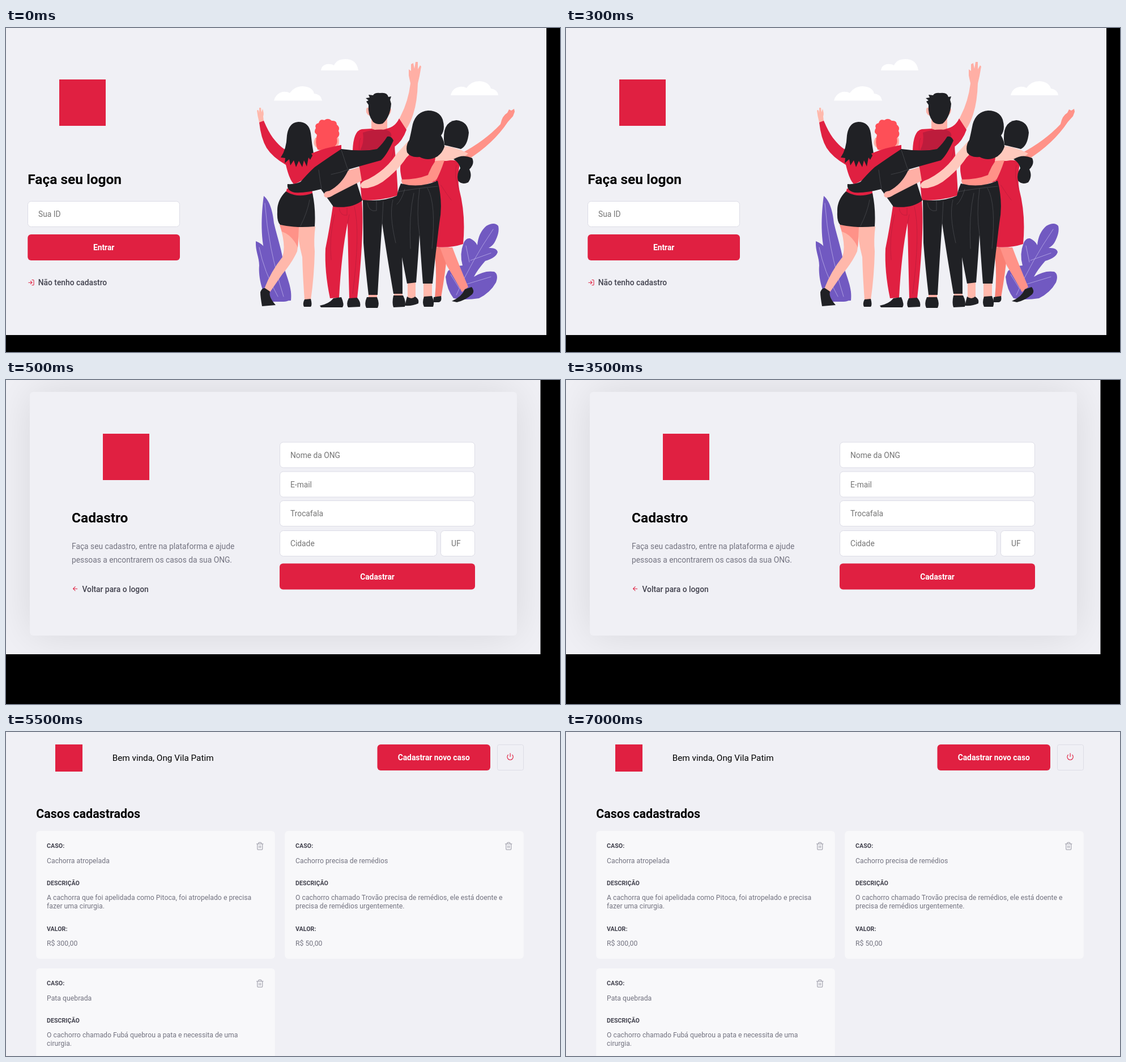
An HTML page for the animation above (8000 ms loop, 978x573 px).

```html
<!DOCTYPE html>
<html lang="pt">
<head>
<meta charset="utf-8">
<title>Cadastro de casos</title>
<style>
  html, body { margin: 0; width: 100%; height: 100%; overflow: hidden; background: #000; }
  svg { position: absolute; left: 0; top: 0; display: block; }
  text { font-family: Roboto, sans-serif; white-space: pre; }
  .icon, .line { fill: none; stroke-linecap: round; stroke-linejoin: round; }
</style>
</head>
<body>
<svg id="stage" width="978" height="573" viewBox="0 0 978 573"></svg>
<script>
const RED = '#e02041', BG = '#f0f0f5', DARK = '#41414d', GREY = '#737380', HINT = '#757575';
const BLACK = '#202125', WINE = '#bd1c3c', PURPLE = '#7159c1', GINGER = '#fe4f57';
const PALE = '#ffc9bd', SKIN = '#ffb8ab', PEACH = '#ffafa5', CORAL = '#ff9288', RUST = '#f97f73';

const rect = (x, y, w, h, fill, r = 0, extra = '') =>
  `<rect x="${x}" y="${y}" width="${w}" height="${h}" rx="${r}" fill="${fill}" ${extra}/>`;
const text = (x, y, str, size, fill, weight = 400, anchor = 'start') =>
  `<text x="${x}" y="${y}" font-size="${size}" fill="${fill}" font-weight="${weight}" text-anchor="${anchor}">${str}</text>`;
const shape = (fill, ...paths) => paths.map(d => `<path fill="${fill}" d="${d}"/>`).join('');
const line = (stroke, d, width = 0.8) =>
  `<path class="line" stroke="${stroke}" stroke-width="${width}" d="${d}"/>`;
const icon = (x, y, size, stroke, d) =>
  `<path class="icon" stroke="${stroke}" stroke-width="2" transform="translate(${x} ${y}) scale(${size / 24})" d="${d}"/>`;
const field = (x, y, w, hint) =>
  rect(x + .5, y + .5, w - 1, 45, '#fff', 6, 'stroke="#dcdce6"') + text(x + 19, y + 28, hint, 13.8, HINT);
const button = (x, y, w, label) =>
  rect(x, y, w, 46, RED, 6) + text(x + w / 2, y + 28, label, 13.8, '#fff', 700, 'middle');

const ICONS = {
  login: 'M15 3h4a2 2 0 0 1 2 2v14a2 2 0 0 1-2 2h-4M10 17l5-5-5-5M15 12H3',
  back: 'M19 12H5M12 19l-7-7 7-7',
  power: 'M18.36 6.64a9 9 0 1 1-12.73 0M12 2v10',
  trash: 'M3 6h18M19 6v14a2 2 0 0 1-2 2H7a2 2 0 0 1-2-2V6M8 6V4a2 2 0 0 1 2-2h4a2 2 0 0 1 2 2v2M10 11v6M14 11v6'
};

function scenery() {
  return shape('#fff',
      'M556 75Q557 66 566 64Q574 63 579 66Q584 55 599 55Q619 55 622 75Z',
      'M473 128.5Q476 116 488 113Q496 112 501 115Q509 103 524 103Q541 104 544 116Q556 117 558 128.5Z',
      'M785 119Q788 106 801 104Q808 103 813 106Q821 94 836 94Q852 95 856 107Q868 109 869 119Z') +
    shape(PURPLE,
      'M455 297C466 306 471 325 473 345C480 375 488 395 490 420C495 440 506 460 503 482L468 484C460 470 470 440 462 410C450 388 449 340 455 297Z',
      'M441 377C455 382 465 395 470 415C480 430 502 445 503 472Q503 484 490 484L467 484C453 475 445 440 447 420C447 405 440 395 441 377Z',
      'M780 430Q790 420 806 420Q800 400 808 380Q812 371 819 372Q828 376 832 384Q834 362 848 350Q862 342 869 350Q872 362 862 380Q858 386 852 389Q866 388 868 396Q866 406 846 412Q832 428 826 440Q845 428 862 431Q870 436 865 450Q855 468 835 478Q810 482 790 478Q778 462 776 440Z') +
    line('#b9ace6', 'M457 310Q460 350 468 390T490 475M447 388Q455 430 480 475M795 472Q822 412 860 356M818 414L812 385M820 411L856 398M803 456Q830 448 856 440M800 460L785 436');
}

function leftWoman() {
  return shape(SKIN,
      'M447 167Q444 156 443 146Q446 143 447 150L447 141L450 141L451 149L453 143Q456 152 454 156L455 165Z',
      'M483 348L517 352Q517 378 514 395Q505 415 488 435L466 467L456 461Q468 430 488 405Q495 385 483 348Z',
      'M515 352L546 351Q543 375 545 395Q544 440 538 481L527 481Q524 440 523 405Q515 375 515 352Z') +
    shape(CORAL, 'M483 348L517 352L515 388Q505 366 487 360Z') +
    shape(RED,
      'M447 167L455 164Q463 183 471 194Q485 212 495 216L530 230L545 220Q565 214 592 207L590 220Q560 235 545 248Q525 272 508 276Q500 268 494 242Q470 228 460 212Q450 195 447 167Z',
      'M496 284L540 284L542 299L492 298Z') +
    shape(BLACK,
      'M494 289Q478 305 479 325Q478 342 484 348Q510 354 545 351Q547 320 541 292Q515 302 494 289Z',
      'M516 166Q535 166 538 186Q540 205 543 222L537 233L534 229L531 245L526 234L523 246L517 235L512 246L508 234L502 243L500 232L492 239L493 230L485 229Q495 215 496 190Q499 167 516 166Z',
      'M457 460L466 466Q463 475 476 490L452 492Q449 475 449 467Q452 459 457 460Z',
      'M527 480L538 479Q541 490 538 493L526 493Q523 488 527 480Z') +
    line('#55565c', 'M536 304Q532 326 520 350', .6);
}

function gingerMan() {
  return shape(PEACH, 'M546 194Q540 206 549 212L553 217L584 212Q590 204 587 194Z') +
    shape(GINGER, 'M550 215Q545 201 549 189Q542 184 547 177Q544 170 552 168Q554 160 562 163Q569 158 575 164Q584 163 584 171Q590 175 587 182Q591 190 584 195Q587 207 576 212Q565 218 550 215Z') +
    shape(RED, 'M539 222Q565 211 592 207L592 217L550 241Z',
      'M577 315Q605 318 628 303Q633 360 620 478L606 478Q604 400 603 345Q592 400 588 477L572 478Q562 430 564 390Q572 350 577 315Z') +
    line(WINE, 'M588 318Q590 333 602 331V318M603 345L606 330M615 316Q626 360 612 470M580 330Q570 370 574 410') +
    shape(BLACK,
      'M497 276Q510 277 520 272Q535 255 545 246Q575 225 592 214Q630 219 655 214Q665 205 673 192Q680 190 684 199Q672 225 662 234Q640 240 605 250L618 270L629 305Q610 320 578 316L556 285Q530 292 510 291Q495 288 497 276Z',
      'M554 491Q570 488 578 478L592 476Q598 490 594 494L556 494Z',
      'M605 478L620 477Q627 485 625 493L604 494Q600 488 605 478Z') +
    line('#55565c', 'M592 216L603 249M552 251Q554 267 557 284M605 250Q590 256 574 259', .6) +
    shape(PEACH, 'M604 252L624 246L628 270Q602 283 579 295Q567 303 562 298Q559 289 571 288Q593 276 604 252Z');
}

function tallMan() {
  return shape(PEACH,
      'M697 155Q710 130 714 98L711 84L711 73L715 76L715 64L719 62L721 72L723 60L727 60L727 73L731 66L733 68L730 85L727 98Q726 130 719 152Q714 168 706 180L690 170Z',
      'M640 141Q635 139 636 149Q639 156 645 156V181Q658 187 673 181V155Q679 154 680 145Q679 138 674 142Z',
      'M640 470H655V479H640ZM685 468H700V476H685Z') +
    shape(RED, 'M612 217Q613 182 628 179L645 178Q659 184 672 178Q687 175 694 160L707 180Q700 200 686 210Q690 250 692 296Q665 305 628 305Q624 260 623 235Z') +
    shape(WINE, 'M630 185Q650 178 672 180Q682 185 680 192Q665 205 655 214L625 217Q633 202 630 185Z') +
    shape(BLACK,
      'M640 136L636 130L640 128L635 124L642 123L640 118L648 119Q651 114 660 115Q673 113 675 122L680 121L678 127L680 134Q678 158 665 169Q655 172 648 166Q638 153 640 136Z',
      'M630 304Q665 308 692 296Q700 360 700 470L684 470Q672 400 664 345Q660 400 656 472L640 472Q634 420 631 380Z',
      'M637 476L655 476Q660 488 656 495L636 495Q632 488 637 476Z',
      'M684 473L701 473Q707 485 704 493L684 494Q681 486 684 473Z') +
    line('#55565c', 'M638 309Q640 326 654 323V306M664 345L666 307M683 304Q676 330 688 380', .6) +
    line(WINE, 'M624 223Q622 200 626 195M686 211L681 230');
}

function rightWomen() {
  return shape(RUST, 'M755 387L780 389Q776 430 768 477L757 477Q762 430 755 387Z') +
    shape(CORAL, 'M766 388L788 388Q800 420 816 458L805 467Q790 440 778 420Z',
      'M803 222Q845 200 873 170Q876 155 885 150L888 144L892 146L897 143L898 148L895 156L886 166Q860 205 815 233Z') +
    shape(RED, 'M756 240Q780 230 802 236Q796 262 800 285Q812 330 807 382Q780 391 750 386Q760 350 765 320Q758 285 756 240Z',
      'M710 218L762 222Q764 245 757 272Q725 280 700 272Q692 245 700 233Z') +
    line(WINE, 'M768 278Q778 294 786 304M795 243Q790 260 799 285') +
    shape(PALE, 'M761 207Q790 208 816 222Q803 235 757 236Z',
      'M711 199Q723 216 707 229Q692 252 665 272Q645 285 628 283Q620 274 640 267Q671 251 690 222Z') +
    shape(CORAL, 'M774 234Q767 255 760 268Q740 282 712 280Q697 278 698 268Q725 268 745 260Q750 246 758 235Z') +
    shape(SKIN, 'M709 450H723V478H709ZM737 450H752V477H737Z') +
    shape(BLACK,
      'M795 163Q815 165 817 185Q815 208 803 214Q786 210 774 207Q768 166 795 163Z',
      'M790 232Q806 222 823 230Q828 240 818 250Q824 262 816 273Q805 278 798 270Q795 258 802 248Q800 238 790 232Z',
      'M745 146Q765 146 771 162Q776 180 768 190Q774 200 774 210Q770 222 760 228Q745 236 730 228Q715 230 708 220Q705 208 712 198Q715 185 718 170Q724 148 745 146Z',
      'M697 275Q730 284 762 270Q772 310 765 345Q758 400 753 452L736 452Q732 400 730 365Q728 400 724 450L708 452Q700 410 694 380Q684 340 687 315Q690 290 697 275Z',
      'M708 475Q716 481 722 475Q730 479 728 487Q718 492 704 491Z',
      'M738 475L752 474Q757 486 754 493L738 493Q734 486 738 475Z',
      'M755 476L768 474Q770 484 764 485L754 485Z',
      'M787 483Q805 475 810 462L822 458Q828 465 823 471Q810 482 796 485Z') +
    line('#55565c', 'M690 290Q720 284 762 280M730 365Q724 330 730 284M704 285Q698 305 690 312M744 283Q760 310 752 390M720 292Q711 330 714 390', .6);
}

function logon() {
  return rect(0, 0, 954, 543, BG) + rect(94, 91, 82, 82, RED) +
    text(38.3, 275.5, 'Faça seu logon', 24.5, '#000', 700) +
    field(38, 306, 269, 'Sua ID') + button(38.3, 365, 268.7, 'Entrar') +
    icon(38.3, 444, 12.3, RED, ICONS.login) +
    text(56.8, 455, 'Não tenho cadastro', 13.8, DARK, 500) +
    scenery() + leftWoman() + tallMan() + gingerMan() + rightWomen();
}

function register() {
  const card = [42, 21, 860, 431];
  return `<clipPath id="page">${rect(0, 0, 943.5, 485, BG)}</clipPath><g clip-path="url(#page)">` +
    rect(0, 0, 944, 485, BG) +
    rect(...card, '#000', 6, 'opacity=".1" style="filter:blur(38px)"') + rect(...card, BG, 6) + '</g>' +
    rect(171, 95, 82, 82, RED) +
    text(116, 251.5, 'Cadastro', 24.5, '#000', 700) +
    text(116, 298.5, 'Faça seu cadastro, entre na plataforma e ajude', 13.8, GREY) +
    text(116, 322.5, 'pessoas a encontrarem os casos da sua ONG.', 13.8, GREY) +
    icon(116, 363, 12.3, RED, ICONS.back) +
    text(134.5, 374.5, 'Voltar para o logon', 13.8, DARK, 500) +
    field(483, 109.5, 345, 'Nome da ONG') + field(483, 161.5, 345, 'E-mail') +
    field(483, 213, 345, 'Trocafala') + field(483, 266, 278, 'Cidade') + field(767, 266, 61, 'UF') +
    button(483, 324.5, 345, 'Cadastrar');
}

function caseCard(x, y, title, lines, value) {
  const label = (dy, str) => text(x + 18.7, y + dy, str, 10.7, DARK, 700);
  const body = (dy, str) => text(x + 18.7, y + dy, str, 12.25, GREY);
  return rect(x, y, 421.5, 226, '#f8f8fa', 6) +
    label(29.5, 'CASO:') + body(56.5, title) +
    label(95.7, 'DESCRIÇÃO') + lines.map((str, i) => body(122 + i * 15.3, str)).join('') +
    label(176.5, 'VALOR:') + body(203, value) +
    icon(x + 387.3, y + 19, 15.3, '#a8a8b3', ICONS.trash);
}

function cases() {
  return rect(0, 0, 978, 573, BG) + rect(87, 22, 48, 48, RED) +
    text(187.7, 51, 'Bem vinda, Ong Vila Patim', 15.3, '#000') +
    button(655.5, 22, 199.5, 'Cadastrar novo caso') +
    rect(867.5, 22.5, 46, 45, 'none', 3, 'stroke="#dcdce6"') +
    icon(883.2, 36.6, 13.8, RED, ICONS.power) +
    text(53.3, 152, 'Casos cadastrados', 21.45, '#000', 700) +
    caseCard(53.3, 175, 'Cachorra atropelada',
      ['A cachorra que foi apelidada como Pitoca, foi atropelado e precisa', 'fazer uma cirurgia.'], 'R$ 300,00') +
    caseCard(492.3, 175, 'Cachorro precisa de remédios',
      ['O cachorro chamado Trovão precisa de remédios, ele está doente e', 'precisa de remédios urgentemente.'], 'R$ 50,00') +
    caseCard(53.3, 418, 'Pata quebrada',
      ['O cachorro chamado Fubá quebrou a pata e necessita de uma', 'cirurgia.'], 'R$ 80,00');
}

const LOOP = 8000;
const scenes = [[logon, 0, 500], [register, 500, 5500], [cases, 5500, LOOP]];
const stage = document.getElementById('stage');
stage.innerHTML = scenes.map(([draw]) => `<g>${draw()}</g>`).join('');
scenes.forEach(([, start, end], i) => {
  const key = (time, opacity) => ({ offset: time / LOOP, opacity, easing: 'step-end' });
  stage.children[i].animate(
    [key(0, start ? 0 : 1), key(start, 1), key(end, 0), key(LOOP, 0)],
    { duration: LOOP, iterations: Infinity });
});
</script>
</body>
</html>
```
